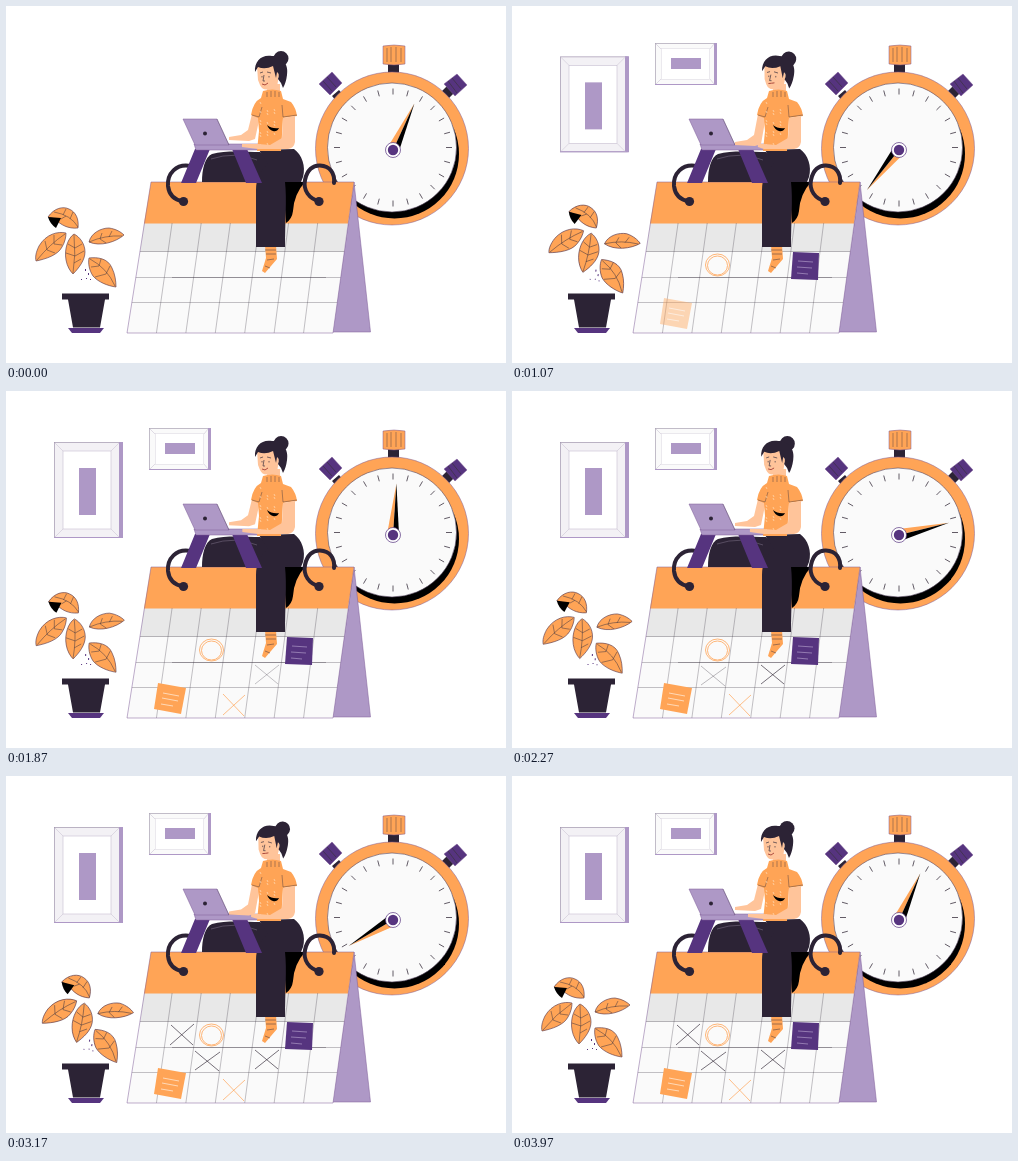
An HTML page for the animation above (4.01 s loop, 500 by 357 pixels).

```html
<!DOCTYPE html>
<html lang="en">
<head>
<meta charset="utf-8">
<title>Time planning</title>
<style>
html, body { margin: 0; width: 100%; height: 100%; overflow: hidden; background: #fff; }
svg { display: block; width: 100vw; height: 100vh; }
.o { fill: #ffa456; } .d { fill: #2c2335; } .p { fill: #56347f; } .l { fill: #ae98c6; }
.s { fill: #ffc49a; } .w { fill: #fafafa; }
.line { fill: none; stroke: #3b3340; stroke-width: .7; }
.edge { stroke: #7d5a97; stroke-width: .5; }
.leaf { stroke: #513044; stroke-width: .6; }
.bevel { fill: none; stroke: #cdc6d6; stroke-width: .6; }
.ring { fill: none; stroke: #2c2335; stroke-width: 4; stroke-linecap: round; }
</style>
</head>
<body>
<svg viewBox="0 0 500 357">
  <g id="smallFrame">
    <rect class="w" x="143.500" y="37.500" width="61" height="41" stroke="#a9a2b3" stroke-width=".7"/>
    <path class="l" d="M202 37h3v42h-62v-1h59z"/>
    <rect x="149.500" y="42.500" width="48" height="31" fill="#fff" stroke="#e0dce5" stroke-width=".6"/>
    <path class="bevel" d="M144 38l5 5M202 38l-4 5M144 78l5-5M202 78l-4-5"/>
    <rect class="l" x="159" y="52" width="30" height="11"/>
  </g>
  <g id="bigFrame">
    <rect x="48.500" y="51.500" width="67" height="95" fill="#f3f1f5" stroke="#a094ad" stroke-width=".7"/>
    <path class="l" d="M113 51h4v96h-69v-1h65z"/>
    <rect x="57" y="60" width="48" height="78" fill="#fff" stroke="#cdc6d6" stroke-width=".7"/>
    <path class="bevel" d="M49 52l8 8M113 52l-8 8M49 146l8-8M113 146l-8-8"/>
    <rect class="l" x="73" y="77" width="17" height="47"/>
  </g>

  <g id="stopwatch">
    <path class="d" d="M382 57h11v10h-11zM326 90l7-6 6 7-7 6zM436 85l6-6 7 7-6 6z"/>
    <path class="o edge" d="M377 40q11-2 22 0v18q-11 2-22 0z"/>
    <path class="line" stroke-opacity=".6" d="M381 42v14M385 41v15M390 41v15M395 42v14"/>
    <path class="p edge" d="M313 78l13-12 10 11-12 12zM438 78l13-10 10 11-12 11z"/>
    <path class="line" d="M317 75l9 10M321 71l9 10M446 72l9 11M442 75l9 12"/>
    <circle class="o edge" cx="386" cy="142.500" r="76.500"/>
    <circle cx="388.500" cy="148" r="64.500"/>
    <circle class="w" cx="386" cy="141.500" r="64.500" stroke="#55465f" stroke-width=".6"/>
    <path id="ticks" class="line" style="stroke-width:.8"/>
    <g id="hand">
      <path class="o" d="M387 92.500L381.500 139l5.500 5z"/>
      <path d="M387 92.500L392.500 139l-5.500 5z"/>
    </g>
    <circle cx="387" cy="144" r="7.500" fill="#fff" stroke="#56347f" stroke-width=".7"/>
    <circle class="p" cx="387" cy="144" r="5.200"/>
  </g>

  <g id="calendar">
    <path class="l edge" d="M348 176l16.500 150h-38z"/>
    <path class="w" d="M145 176h203l-21 151H121z"/>
    <path fill="#e8e8e8" d="M138 217h204l-4 29H134z"/>
    <path class="o" d="M145 176h203l-6 41.500H138z"/>
    <path id="grid" class="line" stroke-opacity=".5" style="stroke-width:.6"/>
    <path class="line" d="M166 271.500h154" stroke-opacity=".5"/>
    <path class="edge" fill="none" d="M145 176h203l-21 151H121z"/>
  </g>

  <g id="marks">
    <g id="circle" fill="none" stroke="#ffa456" stroke-width=".8">
      <ellipse cx="205.500" cy="259" rx="12" ry="11"/>
      <ellipse cx="205.500" cy="259.500" rx="10" ry="9.500"/>
    </g>
    <g id="purpleNote">
      <path class="p" d="M281 246l26 1-1 27-27-1z"/>
      <path class="line" style="stroke:#ae98c6" d="M286 255l15 1M285 261l15 1M285 267l11 1"/>
    </g>
    <g id="orangeNote">
      <path class="o" d="M152 292l28 5-5 26-27-5z"/>
      <path class="line" style="stroke:#fff0e0" d="M157 302l16 3M156 307l16 3M155 313l12 2"/>
    </g>
    <path id="crossA" fill="none" stroke="#ffa456" stroke-width=".7" d="M217 303l21 22M239 304l-22 20"/>
    <path id="crossB" class="line" d="M249 274l23 19M273 274l-24 19"/>
    <path id="crossC" class="line" d="M189 275l24 20M214 276l-25 18"/>
    <path id="crossD" class="line" d="M165 249l22 20M188 248l-24 21"/>
  </g>

  <path class="ring" d="M185 160C170 157 161 168 162 180C163 189 169 194 177 195.500"/>
  <circle class="d" cx="177.500" cy="195.500" r="4.600"/>

  <g id="seat">
    <path d="M277 176h22q-11 12-12 29-1 8-7 12z"/>
    <path class="d" d="M196 176C196 163 199 151 206 148C220 144 240 146 254 146L272 158L254 176z"/>
    <path class="line" style="stroke:#6a5f74" d="M205 153q24-8 46 1"/>
    <path class="o" d="M259 239h11l1 14-6 7-6 7-3-2 4-13z"/>
    <path class="line" d="M259 244h11M260 248h10M261 254l7-1M259 260l5 2" stroke-opacity=".7"/>
    <path class="d" d="M253 144L288 143C296 149 300 160 297 171L295 176H279C281 193 279 216 279 241H250V184C250 172 254 164 262 158z"/>
  </g>

  <g id="desk">
    <path class="p" d="M189 143h15l-14 34h-15zM226 143h15l15 34h-16z"/>
    <path class="l edge" d="M188 138h64l2 6h-64z"/>
    <path class="l edge" d="M177 113h34l12 26h-34z"/>
    <path class="line" stroke-opacity=".4" d="M211 113l12 26"/>
    <circle class="d" cx="199" cy="127.500" r="2"/>
  </g>

  <g id="woman">
    <path id="backArm" class="s"/>
    <path class="s" d="M261 78h13v10h-13z"/>
    <path class="o" d="M257 85q9-3 18 0l2 8 8 3q5 6 6 14l-14 2-2 33h-24l2-20-1-13-7-3q2-13 10-17z"/>
    <path class="line" stroke-opacity=".6" d="M261 86v5M265 85v6M269 85v6M273 86v5M246 109l7 2 3-10M276 99l1 12 14-2"/>
    <path id="knit" fill="none" stroke="#ffd7ae" stroke-width=".8"/>
    <path d="M261 119q5 4 12 3-2 4-6 3-4-1-6-6z"/>
    <path id="frontArm" class="s"/>
    <g id="head">
      <circle class="d" cx="275" cy="52.500" r="7.500"/>
      <path class="s" d="M251 60q9-5 18 1l4 8-2 12q-5 3-8 2-6 2-9-4l-2-5z"/>
      <path class="d" d="M249 66C248 55 256 48 266 50C276 50 283 58 281 69Q280 77 277 82L275 77L272 73Q274 68 271 66L270 72L267 60Q259 64 252 61z"/>
      <path class="line" d="M254 67l3-1M261 66l4 1M256 70v1.500M263 70v1.500M258 69l-1 6 2 0"/>
      <path id="mouth" fill="none" stroke="#a53f35" stroke-width=".9"/>
    </g>
  </g>

  <path class="ring" d="M313 195C303 193 297 184 299 174C301 164 307 159 314 159.500C324 160 329 167 328 177"/>
  <circle class="d" cx="313" cy="195.500" r="4.600"/>

  <g id="plant">
    <g id="leaves">
      <path class="o leaf" d="M42 211C48 202 57 200 63 203C70 206 73 213 72 222C62 223 55 219 49 213z"/>
      <path d="M42 211l13 1-5 10q-6-4-8-11z"/>
      <path class="o leaf" d="M60 227C52 225 40 228 33 240C30 246 29 251 30 255C40 253 52 249 56 241C59 236 60 231 60 227z"/>
      <path class="o leaf" d="M68 228C62 232 58 243 60 254C61 260 64 265 67 268C73 262 79 254 79 246C79 238 74 231 68 228z"/>
      <path class="o leaf" d="M83 236C85 227 95 222 103 222C110 223 115 226 118 229C110 236 94 241 83 236z"/>
      <path class="o leaf" d="M83 252C91 251 102 252 106 262C109 268 110 275 110 281C102 280 92 276 87 270C83 264 82 257 83 252z"/>
      <path class="line" stroke-opacity=".7" d="M48 206q17 3 24 15M57 209l3-6M64 213l3-7M60 210l-5 3M59 228Q44 238 31 254M48 238v-9M41 244l-2-9M48 238l8 1M41 244l8 3M68 229Q70 249 67 267M69 242l-7-4M69 250l-9-3M69 242l7-4M69 250l9-5M68 257l7-4M83 236q16-7 33-6M94 233l2-6M103 231l3-6M94 233l6 4M84 253q17 9 25 27M93 260l2-7M100 268l4-8M93 260l-8 1M100 268l-11 3"/>
      <path class="p" d="M79 263h1v2h-1zM82 267h1v2h-1zM80 272h1v1h-1zM75 273h1v1h-1zM84 273h1v1h-1z"/>
    </g>
    <path class="d" d="M56 287.500h47v6h-4l-5 28H67l-5-28h-6z"/>
    <path class="p" d="M62 322h36l-4 5H66z"/>
  </g>
</svg>
<script>
const LOOP = 4010, MOTION = 3970;
const $ = id => document.getElementById(id);
const set = (id, name, value) => $(id).setAttribute(name, value);
const progress = (t, start, length) => Math.min(1, Math.max(0, (t - start) / length));
const easeOut = u => 1 - (1 - u) ** 2;

const ticks = Array.from({ length: 24 }, (_, i) => {
  const a = i * Math.PI / 12, x = Math.sin(a), y = -Math.cos(a);
  return `M${387 + 53 * x} ${141.5 + 53 * y}L${387 + 59 * x} ${141.5 + 59 * y}`;
});
set('ticks', 'd', ticks.join(''));

const leftEdge = y => 121 + (327 - y) * 24 / 151;
const rightEdge = y => 327 + (327 - y) * 21 / 151;
const column = (i, y) => leftEdge(y) + (rightEdge(y) - leftEdge(y)) * i / 7;
let grid = '';
for (let i = 1; i < 7; i++) grid += `M${column(i, 217) - 1.5} 217L${column(i, 327)} 327`;
for (const y of [245.5, 271.5, 296.5]) grid += `M${leftEdge(y)} ${y}H${rightEdge(y)}`;
set('grid', 'd', grid);

let knit = '';
for (let i = 0; i < 20; i++) knit += `M${254 + i * 7 % 21} ${96 + i * 11 % 45}l1 2`;
set('knit', 'd', knit);

// [id, start time]
const fades = [
  ['circle', 200], ['purpleNote', 470], ['orangeNote', 900], ['crossA', 1150],
  ['crossB', 1700], ['crossC', 2080], ['crossD', 2560]
];
const frames = [['smallFrame', 400], ['bigFrame', 700]];

function draw(t) {
  const turn = Math.min(t / MOTION, 1);
  const sway = (1 - Math.cos(turn * 4 * Math.PI)) / 2;

  for (const [id, start] of fades) set(id, 'opacity', progress(t, start, 400));
  for (const [id, start] of frames) {
    const u = progress(t, start, 460);
    set(id, 'opacity', Math.min(1, u * 2));
    set(id, 'transform', `translate(0 ${-17 * (1 - easeOut(u))})`);
  }

  set('hand', 'transform', `rotate(${24.5 + 720 * turn} 387 144)`);
  set('leaves', 'transform', `rotate(${10.8 * sway} 78 288)`);
  set('head', 'transform', `rotate(${3 * sway} 265 86)`);
  set('mouth', 'd', `M256 78q3 ${2.5 - 3 * sway} 6 -1`);

  const backY = 131 + 5 * sway, frontX = 236 + 10 * sway;
  set('backArm', 'd', `M246 108L254 110L249 ${backY + 2}L243 ${backY + 4}L223 ${backY + 3}` +
    `V${backY}L235 ${backY - 2}L242 ${backY - 7}z`);
  set('frontArm', 'd', `M277 112L289 110L289 136Q288 142 282 143L252 143L${frontX} 141` +
    `V138L252 138L264 139L276 132z`);
}

function tick(now) {
  draw(now % LOOP);
  requestAnimationFrame(tick);
}
draw(0);
requestAnimationFrame(tick);
</script>
</body>
</html>
```
